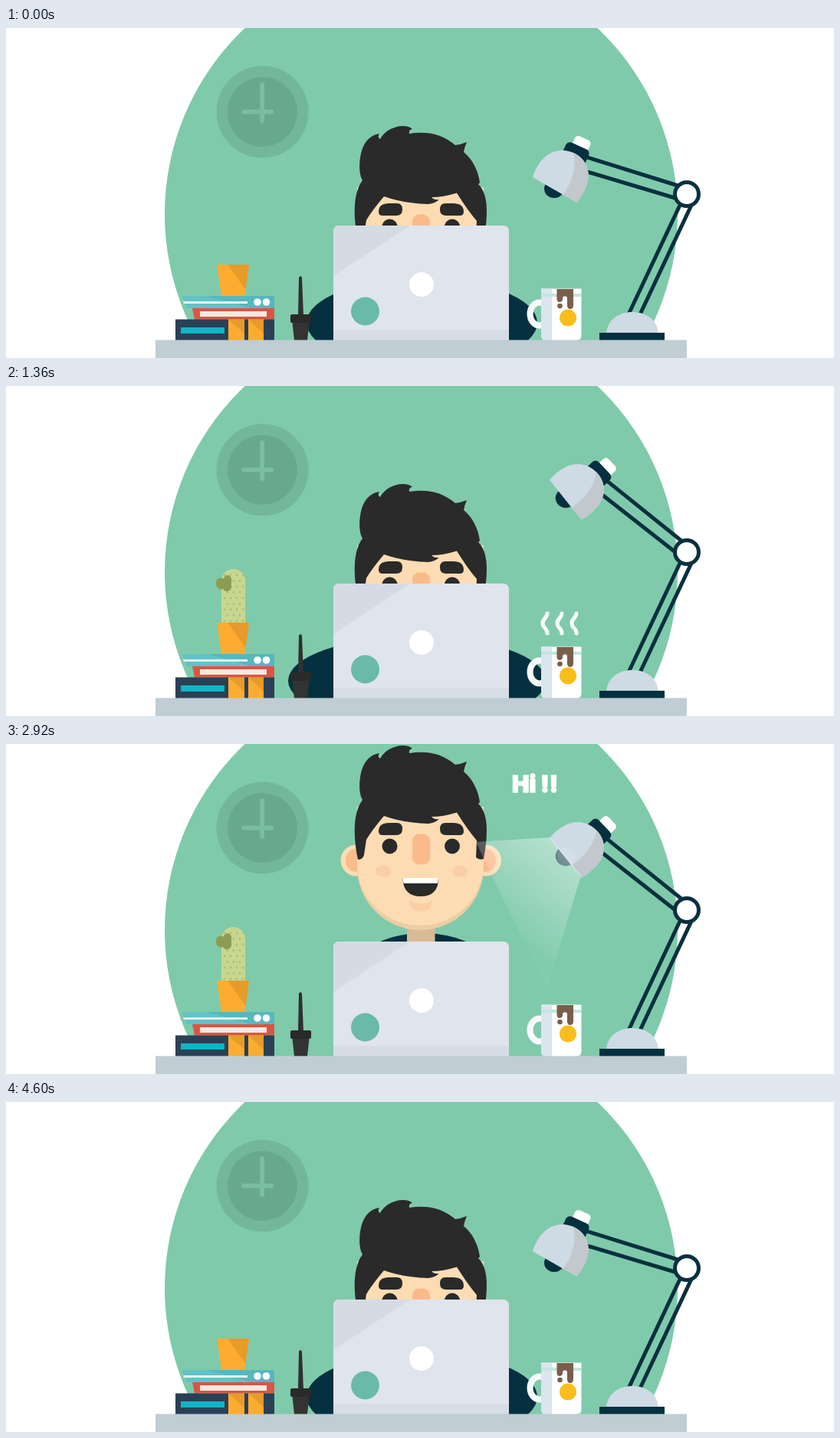
An HTML page for the animation above (4640 ms loop, 1080x431 px).

```html
<!DOCTYPE html>
<html lang="en">
<head>
<meta charset="utf-8">
<title>Desk</title>
<style>
  html, body { margin: 0; width: 100%; height: 100%; overflow: hidden; background: #fff; }
  svg { display: block; width: 100%; height: 100%; }
  .navy { fill: #04303f; }
  .rail { stroke: #0a303e; stroke-width: 5; fill: none; }
  .dark { fill: #2a2a2a; }
  .white { fill: #fff; }
  .gold { fill: #fdac30; }
  .amber { fill: #e69b2b; }
  .steel { fill: #cedbe4; }
  #hi { font: 900 30px Inter, "Open Sans", sans-serif; fill: #fff; stroke: #fff; stroke-width: 1.4; stroke-linejoin: round; }
  #steam { fill: none; stroke: #fff; stroke-width: 5; stroke-linecap: round; }
</style>
</head>
<body>
<svg viewBox="0 0 1080 431">
  <defs>
    <linearGradient id="glow" gradientUnits="userSpaceOnUse" x1="735" y1="145" x2="656" y2="242">
      <stop offset="0" stop-color="#fff" stop-opacity=".42"/>
      <stop offset="1" stop-color="#fff" stop-opacity=".04"/>
    </linearGradient>
    <clipPath id="face"><path d="M458 85H623V164A82.5 82 0 0 1 458 164Z"/></clipPath>
    <clipPath id="aboveDesk"><path d="M0-60H1080V408H0Z"/></clipPath>
    <clipPath id="abovePot"><path d="M260 200H330V310H260Z"/></clipPath>
    <path id="wave" pathLength="1" stroke-dasharray="1 2" d="M706 323C706 315 700 317 700 310S706 303 706 297"/>
  </defs>

  <circle cx="541.5" cy="243" r="334.5" fill="#7fcaab"/>

  <g id="clock">
    <circle cx="334.5" cy="109.5" r="60" fill="#73b799"/>
    <circle cx="334.5" cy="109.5" r="45.5" fill="#68a98d"/>
    <path d="M334 74V121M310 109.500H346" stroke="#7bbd9f" stroke-width="6" stroke-linecap="round"/>
  </g>

  <text id="hi" x="660" y="63">Hi !!</text>

  <g clip-path="url(#aboveDesk)">
    <ellipse id="arms" class="navy" cy="385" ry="58" fill="#02293c"/>
    <g id="head">
      <ellipse class="navy" cx="544" cy="326" rx="108" ry="76"/>
      <path d="M523 225H559.500V262H523Z" fill="#d9ba96"/>
      <g id="ears">
        <circle cx="457" cy="155" r="20.500" fill="#fddcb3"/><ellipse cx="456" cy="155" rx="13" ry="15" fill="#fbbb8b"/>
        <circle cx="625.500" cy="155" r="20.500" fill="#fddcb3"/><ellipse cx="626" cy="155" rx="13" ry="15" fill="#fbbb8b"/>
      </g>
      <g clip-path="url(#face)">
        <path d="M450 80H630V250H450Z" fill="#eccda4"/>
        <path d="M458 80H623V160A82.500 80 0 0 1 458 160Z" fill="#fddcb3"/>
      </g>
      <rect x="530" y="120.500" width="23" height="40" rx="9" fill="#fbba8a"/>
      <g fill="#facfa5">
        <ellipse cx="492" cy="169" rx="10.500" ry="7.500"/>
        <ellipse cx="592" cy="169" rx="10.500" ry="7.500"/>
        <path d="M526 207Q541 216 556 207Q555 222 541 222T526 207Z"/>
      </g>
      <g class="dark">
        <circle cx="500.500" cy="136.500" r="10"/>
        <circle cx="582" cy="136.500" r="10"/>
        <path d="M486 117Q486 106 500 106H510Q517 106 517 114T509 122H491Q486 122 486 117Z"/>
        <path d="M597 117Q597 106 583 106H573Q566 106 566 114T574 122H592Q597 122 597 117Z"/>
        <path d="M517.500 178H564Q564 202 541 202T517.500 178Z"/>
        <path d="M459 154C456 140 454 124 455 108C456 95 459 84 465 76C459 66 461 47 464 37C468 25 475 17 487 15Q484 20 488 22C494 11 506 5 518 5Q526 5 530 9Q525 10 526 15C550 11 570 16 586 30Q594 29 601 26Q598 33 597 39C609 49 616 64 618 79L616 81C624 88 627 102 627 115Q627 134 623 153Q617 155 613 151L614 129Q602 115 588 92.500Q570 98 555 98Q559 102 565 101Q560 106 551 107Q519 106 493 97Q477 116 470 128L467 148Q465 154 459 154Z"/>
      </g>
      <path class="white" d="M517.500 178H564L563 185H518.500Z"/>
    </g>
  </g>

  <g id="laptop">
    <path d="M427 408V266Q427 258 435 258H648Q656 258 656 266V408Z" fill="#e0e4ed"/>
    <path d="M427 324V266Q427 258 435 258H527Z" fill="#d5dbe5"/>
    <path d="M427 394H656V408H427Z" fill="#d6dde6"/>
    <circle class="white" cx="542" cy="335" r="16"/>
    <circle cx="468.500" cy="370" r="18.500" fill="#69baa8"/>
  </g>

  <g id="pen">
    <path d="M381 376L382 326Q384 322 386 326L388 376Z" fill="#303030"/>
    <path d="M373 380H396L393 408H376Z" fill="#333"/>
    <rect x="371" y="374" width="27" height="11" rx="2" class="dark"/>
  </g>

  <g clip-path="url(#abovePot)">
    <g id="cactus">
      <path d="M281 320V254.500A15.500 15.500 0 0 1 312 254.500V320Z" fill="#c8d68f"/>
      <g id="spots" fill="#afbe76"></g>
      <path d="M274 258C273 251 281 249 284 252C284 246 294 245 294 253V262C294 269 285 270 283 265C279 267 274 264 274 258Z" fill="#8d9c52"/>
    </g>
  </g>
  <g id="books">
    <path class="gold" d="M275 309H317L311 350H281Z"/>
    <path class="amber" d="M289 309H317L312.500 342Z"/>
    <path d="M230 350H350V366H236Z" fill="#55b8bd"/>
    <path d="M230 350H262L320 366H236Z" fill="#62c3c6"/>
    <path d="M231 357H315V360H232Z" fill="#e9f6f4"/>
    <circle class="white" cx="328" cy="358" r="4.800"/><circle class="white" cx="339.500" cy="358" r="4.800"/>
    <path d="M243 366H350V380.500H246Z" fill="#da5644"/>
    <path d="M253 370H340V377H253Z" fill="#f7e9df"/>
    <path d="M221 380.500H350V408H221Z" fill="#2b4054"/>
    <path d="M228 391H285V399H228Z" fill="#10b5c6"/>
    <path class="gold" d="M290 380.500H311V408H290ZM316 380.500H336V408H316Z"/>
    <path class="amber" d="M290 380.500H311V399ZM316 380.500H336V399Z"/>
  </g>

  <g id="mug">
    <ellipse cx="696" cy="373.500" rx="12.500" ry="15" fill="none" stroke="#f7fafb" stroke-width="8"/>
    <path class="white" d="M698 340.500H750.500V402Q750 408 744 408H704Q699 408 698 402Z"/>
    <path d="M698 340.500H712V408H704Q699 408 698 402Z" fill="#dae5ee"/>
    <path d="M698 347H750.500V351H698Z" fill="#c2e6df"/>
    <path d="M718.500 341H740V362Q740 367 736 367T732 362V352Q729 348 726 352V355Q725 358 722 358T718.500 354Z" fill="#7b5d4b"/>
    <circle cx="722.500" cy="363" r="3.300" fill="#7b5d4b"/>
    <circle cx="733" cy="378.500" r="11" fill="#f9bd1c"/>
  </g>
  <g id="steam">
    <use href="#wave"/><use href="#wave" x="19"/><use href="#wave" x="38"/>
  </g>

  <g id="lamp">
    <path class="rail" d="M882 225L812 374M897 225L827 374"/>
    <path class="steel" d="M783 400C784 381 799 371 817 371S850 381 851 400Z"/>
    <path class="navy" d="M774 398H859V408H774Z"/>
    <g id="arm">
      <path class="rail" d="M752 167L880 207M752 186L876 223"/>
      <ellipse class="navy" cx="715" cy="210" rx="13" ry="12"/>
      <rect x="739" y="143" width="22" height="21" rx="5" class="white" transform="rotate(25 750 153)"/>
      <rect x="727" y="153" width="33" height="22" rx="6" class="navy" transform="rotate(25 743 163)"/>
      <path class="steel" d="M687 195C694 172 710 158 729 160C751 163 764 180 758 204Q753 218 744.500 228Z"/>
      <path d="M740 163C758 172 763 188 758 204Q753 218 744.500 228L727 217.500Q746 190 740 163Z" fill="#c2c8cd"/>
      <g id="beam" transform="rotate(-21.500 888 217)">
        <circle cx="731" cy="147" r="12" fill="#fff" fill-opacity=".12"/>
        <path d="M710 122L750 172L706 318Q660 228 613 128Z" fill="url(#glow)"/>
      </g>
    </g>
    <circle cx="888" cy="217" r="15.500" fill="#fff" stroke="#0a303e" stroke-width="5"/>
  </g>

  <path d="M195 407.500H888V431H195Z" fill="#c0cdd4"/>
</svg>

<script>
const LOOP = 4640, STEP = 40;
const $ = id => document.getElementById(id);
const set = (id, attrs) => {
  for (const k in attrs) $(id).setAttribute(k, attrs[k]);
};

// Value at time t on a track of time, value pairs, eased between them
function track(t, ...p) {
  let i = 0;
  while (i < p.length - 2 && p[i + 2] <= t) i += 2;
  if (t <= p[i] || i >= p.length - 2) return p[i + 1];
  const u = (t - p[i]) / (p[i + 2] - p[i]);
  return p[i + 1] + (p[i + 3] - p[i + 1]) * u * u * (3 - 2 * u);
}

let dots = "";
for (let row = 0; row < 9; row++)
  for (let x = 285 + row % 2 * 4; x < 311; x += 8)
    dots += `<circle cx="${x}" cy="${247 + row * 7.5}" r="1.4"/>`;
$("spots").innerHTML = dots;

function draw(t) {
  const head = track(t, 0, 123, 2600, 123, 2840, -8, 2920, -3, 3040, 0, 4160, 0, 4240, -4, 4480, 126, 4560, 123);
  const left = track(t, 0, 392, 760, 388, 1360, 368, 1900, 390, 2560, 395, 2800, 440, 4280, 440, 4520, 392);
  const right = track(t, 0, 693, 760, 690, 1360, 704, 1900, 694, 2560, 701, 2800, 645, 4280, 645, 4520, 693);
  const lamp = track(t, 0, 0, 280, 0, 600, 24, 720, 21.5, 3240, 21.5, 3480, -7, 3560, -4.9, 3720, 2, 3840, 0);
  const cactus = track(t, 0, 75, 300, 75, 600, -4, 700, 0, 3240, 0, 3480, 75);
  const light = track(t, 0, 0, 800, 0, 880, 1, 1160, 1, 1240, 0, 2760, 0, 2840, 1, 3160, 1, 3240, 0);
  const hi = track(t, 0, 0, 2320, 0, 2440, 1.1, 2520, 1, 4080, 1, 4200, 0);
  const steam = track(t, 0, 1, 1160, 1, 1320, 0, 1760, 0, 1960, -1);

  set("head", { transform: `translate(0 ${head})` });
  set("arms", { cx: (left + right) / 2, rx: (right - left) / 2 });
  set("arm", { transform: `rotate(${lamp} 888 217)` });
  set("cactus", { transform: `translate(0 ${cactus})` });
  set("beam", { opacity: light });
  set("hi", { transform: `translate(693 52) scale(${hi}) translate(-693 -52)` });
  set("steam", { "stroke-dashoffset": steam, opacity: Math.abs(steam) < 1 ? 1 : 0 });
  set("wave", { "stroke-dashoffset": steam });
}

function frame(now) {
  draw(Math.floor(now / STEP) * STEP % LOOP);
  requestAnimationFrame(frame);
}
draw(0);
requestAnimationFrame(frame);
</script>
</body>
</html>
```
